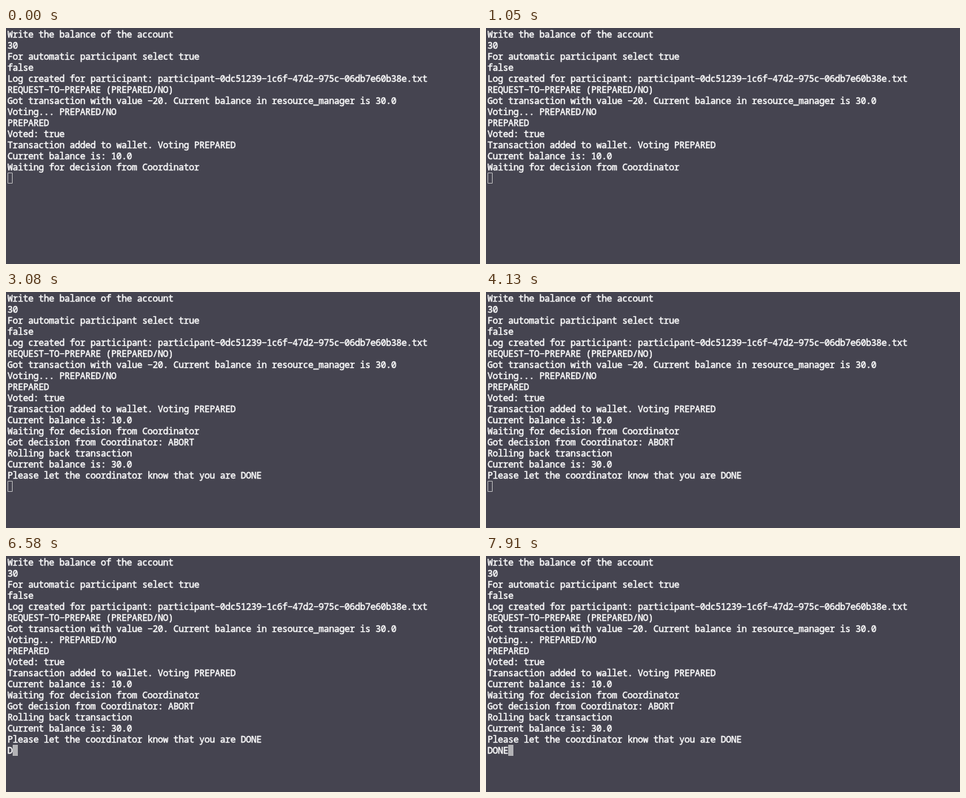
These frames come from a looping animation (640x320 px, 8000 ms). An HTML page with a canvas:

```html
<!DOCTYPE html>
<html lang="en">
<head>
<meta charset="utf-8">
<title>Terminal session</title>
<style>
  html, body { margin: 0; width: 100%; height: 100%; overflow: hidden; background: #454450; }
  canvas { display: block; }
</style>
</head>
<body>
<canvas id="screen" width="640" height="320"></canvas>
<script>
const ctx = document.getElementById('screen').getContext('2d');
const LOOP = 8000;
const CELL = 7, LINE = 15, LEFT = 2, TOP = 1, BASELINE = 12;
const BACK = '#454450', INK = '#ffffff', CURSOR = '#b2b2b5';

const opening = [
  'Write the balance of the account',
  '30',
  'For automatic participant select true',
  'false',
  'Log created for participant: participant-0dc51239-1c6f-47d2-975c-06db7e60b38e.txt',
  'REQUEST-TO-PREPARE (PREPARED/NO)',
  'Got transaction with value -20. Current balance in resource_manager is 30.0',
  'Voting... PREPARED/NO',
  'PREPARED',
  'Voted: true',
  'Transaction added to wallet. Voting PREPARED',
  'Current balance is: 10.0',
  'Waiting for decision from Coordinator'
];
const decision = [
  'Got decision from Coordinator: ABORT',
  'Rolling back transaction',
  'Current balance is: 30.0',
  'Please let the coordinator know that you are DONE'
];
const answer = 'DONE';
const DECISION_AT = 3080, FOCUS_AT = 4340;
const keyTimes = [6580, 6860, 7140, 7420];

// Each glyph is centred in its own terminal cell; a thin outline gives a medium weight.
function drawLine(text, row) {
  const y = TOP + row * LINE + BASELINE;
  // The minus glyph gives the wide hyphen of a terminal face.
  [...text.replaceAll('-', '\u2212')].forEach((ch, col) => {
    const x = LEFT + (col + 0.5) * CELL;
    ctx.fillText(ch, x, y);
    ctx.strokeText(ch, x, y);
  });
}

function drawCursor(col, row, focused) {
  const x = LEFT + col * CELL, y = TOP + row * LINE;
  if (focused) {
    ctx.fillStyle = CURSOR;
    ctx.fillRect(x, y, CELL, LINE);
  } else {
    ctx.strokeStyle = CURSOR;
    ctx.lineWidth = 1;
    ctx.strokeRect(x + 0.5, y + 0.5, CELL - 1, LINE - 1);
  }
}

function draw(t) {
  ctx.fillStyle = BACK;
  ctx.fillRect(0, 0, 640, 320);

  const lines = t < DECISION_AT ? opening : opening.concat(decision);
  const typed = answer.slice(0, keyTimes.filter(k => t >= k).length);

  ctx.fillStyle = ctx.strokeStyle = INK;
  ctx.lineWidth = 0.45;
  ctx.lineJoin = 'round';
  ctx.font = '12px "Noto Sans Mono", "DejaVu Sans Mono", monospace';
  ctx.textAlign = 'center';
  ctx.textBaseline = 'alphabetic';
  lines.forEach(drawLine);
  drawLine(typed, lines.length);
  drawCursor(typed.length, lines.length, t >= FOCUS_AT);
}

const start = performance.now();
function tick() {
  draw((performance.now() - start) % LOOP);
  requestAnimationFrame(tick);
}
tick();
</script>
</body>
</html>
```
